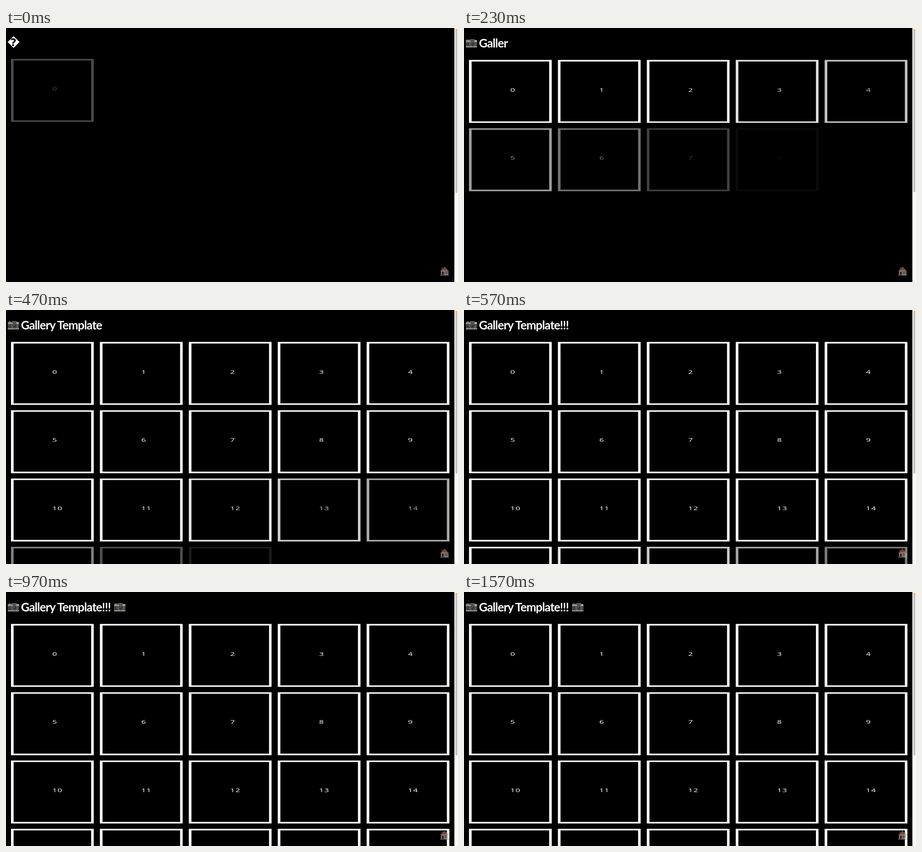
These frames come from a looping animation (998x561 px, 1630 ms). An HTML page:

```html
<!DOCTYPE html>
<html lang="en">
<head>
<meta charset="utf-8">
<title>Gallery Template</title>
<style>
  html, body { margin: 0; width: 100%; height: 100%; overflow: hidden; background: #000; }
  svg { display: block; }
  .title { font: 700 26px Lato, "Open Sans", sans-serif; letter-spacing: -.88px; fill: #fff; white-space: pre; }
  .mark { font: 700 23px "DejaVu Sans", sans-serif; text-anchor: middle; }
  .digit { font: 400 11px "Open Sans", "Noto Sans", sans-serif; letter-spacing: .75px; fill: #fff; }
</style>
</head>
<body>
<svg width="998" height="561" viewBox="0 0 998 561">
  <defs>
    <g id="camera">
      <path d="M2 2V.6H6V2M8.5 2 10 0H19L20.5 2" fill="#8b8d86"/>
      <rect y="1.6" width="25" height="16.4" rx="1.2" fill="#85877f"/>
      <rect y="6" width="25" height="9.6" fill="#3d403c"/>
      <path d="M0 5.6H25M0 16H25" stroke="#b9bab2" stroke-width=".7"/>
      <rect x="10.5" y="1.4" width="8" height="3" fill="#30332f"/>
      <rect x="20.5" y="2.6" width="3" height="1.8" fill="#d5d6cc"/>
      <circle cx="15" cy="10" r="6.8" fill="#a3a59c"/>
      <circle cx="15" cy="10" r="6" fill="#353834"/>
      <circle cx="15" cy="10" r="4.2" fill="#6d7069"/>
      <circle cx="15" cy="10" r="3.2" fill="#292c2b"/>
      <circle cx="14" cy="8.8" r="1" fill="#8f958f"/>
    </g>
    <g id="unknown">
      <path d="M13 0 26 13 13 26 0 13Z" fill="#fff"/>
      <text class="mark" x="12.7" y="21.5">?</text>
    </g>
  </defs>
  <rect width="998" height="561"/>
  <g id="page">
    <use id="cameraA" href="#camera" x="4" y="25"/>
    <use id="unknownA" href="#unknown" x="3.8" y="20.3"/>
    <text id="title" class="title" x="33" y="42.5"></text>
    <use id="cameraB" href="#camera" x="238.7" y="25"/>
    <use id="unknownB" href="#unknown" x="238.5" y="20.3"/>
    <g id="tiles"></g>
  </g>
  <g transform="translate(958 526.5)" opacity=".62">
    <path d="M3.6 2H6.4V8H3.6Z" fill="#7d4a40"/>
    <path d="M2.2 10 10.5 2 18.8 10V19.5H2.2Z" fill="#d8d2cb"/>
    <path d="M10.3.5 20 10 18.6 11.4 10.3 3.7 2 11.4.6 10Z" fill="#a35a4c"/>
    <path d="M10.3 2 17.6 9H3Z" fill="#b87769"/>
    <rect x="4.3" y="11.5" width="4.4" height="8" fill="#7a2e2a"/>
    <rect x="10.6" y="11.2" width="6.2" height="5.4" fill="#58636b"/>
    <path d="M13.7 11.2V16.6M10.6 13.9H16.8" stroke="#eee" stroke-width=".7"/>
    <rect x=".4" y="18.8" width="20" height="1.7" fill="#8a817a"/>
  </g>
  <rect x="990" width="8" height="561" fill="#fafafa"/>
  <rect id="thumb" x="992" y="2" width="4.5" height="362" rx="1" fill="#c1c1c1"/>
  <rect x="992" y="2" width="4.5" height="4.5" rx="1.5" fill="#f3b36b"/>
</svg>
<script>
  const LOOP = 1630, STEP = 25.8, FADE = 195, TICK = 100 / 3;
  const TEXT = "Gallery Template!!!";
  const TEXT_AT = 3; // the camera takes two code units, then a space
  const LAST = TEXT_AT + TEXT.length + 1;
  const $ = id => document.getElementById(id);
  const show = (id, on) => $(id).setAttribute("visibility", on ? "visible" : "hidden");

  const tileMarkup = (_, i) => {
    const x = 11 + 196.33 * (i % 5), y = 70.6 + 150.8 * Math.floor(i / 5);
    return `<g transform="translate(${x} ${y})">
      <path fill="#fff" fill-rule="evenodd" d="M0 0H182.7V139H0ZM5.8 3.4V135.6H177.1V3.4Z"/>
      <text class="digit" transform="translate(91.3 70) scale(1.63 1)">${i}</text></g>`;
  };
  $("tiles").innerHTML = Array.from({ length: 20 }, tileMarkup).join("");
  const tiles = [...$("tiles").children];

  // The first two tiles start off the regular beat.
  const startOf = i => [-36, 66][i] ?? 18 + STEP * i;
  const easeOut = x => Math.sin(Math.PI / 2 * Math.min(1, Math.max(0, x)));

  function render(time) {
    const t = Math.round(Math.floor((time + 3.4) / TICK) * TICK / 10) * 10;
    const units = Math.max(1, Math.floor((t + 22.5) / STEP));

    $("title").textContent = TEXT.slice(0, Math.max(0, units - TEXT_AT));
    show("unknownA", units < 2);
    show("cameraA", units >= 2);
    show("unknownB", units === LAST);
    show("cameraB", units > LAST);
    $("page").setAttribute("transform", `translate(0 ${units < 2 ? -2.3 : 0})`);
    tiles.forEach((tile, i) => tile.setAttribute("opacity", easeOut((t - startOf(i)) / FADE)));
    $("thumb").setAttribute("height", 362 - 3 * Math.min(1, t / 470));
  }

  const origin = performance.now();
  function frame() {
    render((performance.now() - origin) % LOOP);
    requestAnimationFrame(frame);
  }
  frame();
</script>
</body>
</html>
```
